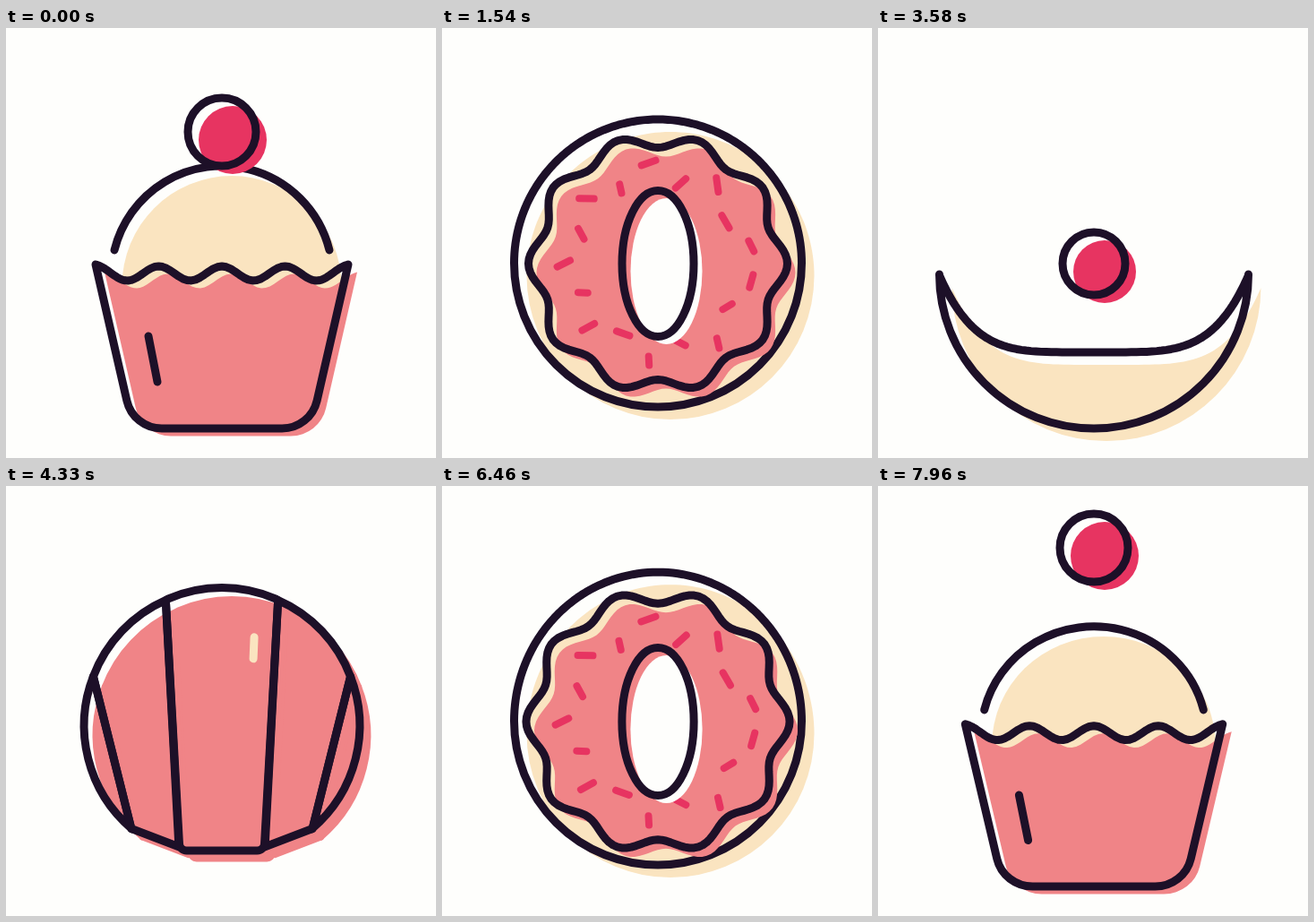
Animation of 480x480 px, one loop 8 s. Source, as an HTML page with a canvas:

```html
<!DOCTYPE html>
<html lang="en">
<head>
<meta charset="utf-8">
<title>Pastries</title>
<style>
html, body { margin: 0; height: 100%; overflow: hidden; background: #fefefc; }
canvas { display: block; width: 480px; height: 480px; }
</style>
</head>
<body>
<canvas id="stage"></canvas>
<script>
const LOOP = 8000, CYCLE = 2700, CX = 241;
const PAPER = '#fefefc', INK = '#1d1028', RED = '#e73461';
const PINK = [240, 132, 135], CREAM = [250, 228, 192];

const canvas = document.getElementById('stage');
const ctx = canvas.getContext('2d');
const ratio = window.devicePixelRatio || 1;
canvas.width = canvas.height = 480 * ratio;

const mix = (a, b, k) => a + (b - a) * k;
const mixAll = (a, b, k) => a.map((v, i) => mix(v, b[i], k));
const rgb = (a, b = a, k = 0) => `rgb(${mixAll(a, b, k).map(Math.round)})`;
const span = (p, from, to) => Math.min(1, Math.max(0, (p - from) / (to - from)));
const smooth = x => x * x * (3 - 2 * x);
const easeOut = (x, power) => 1 - (1 - x) ** power;
// Damped swing from 0 to 1 that overshoots once.
const spring = (t, decay, half) => t <= 0 ? 0 : 1 - Math.exp(-t / decay) * Math.cos(Math.PI * t / half);
const random = seed => {
  const x = Math.sin(seed * 127.1 + 3.7) * 43758.5453;
  return x - Math.floor(x);
};

function stroke(path, color = INK, width = 9) {
  ctx.strokeStyle = color;
  ctx.lineWidth = width;
  ctx.stroke(path);
}

// Bleed widens the fill a little so that neighbours leave no seam.
function fill(path, color, dx = 0, dy = 0, bleed = 0) {
  ctx.save();
  ctx.translate(dx, dy);
  ctx.fillStyle = color;
  ctx.fill(path);
  if (bleed) stroke(path, color, bleed);
  ctx.restore();
}

function ellipse(x, y, rx, ry = rx, from = 0, to = 2 * Math.PI) {
  const path = new Path2D();
  path.ellipse(x, y, Math.max(0, rx), Math.max(0, ry), 0, from, to);
  return path;
}

function line(x1, y1, x2, y2) {
  const path = new Path2D();
  path.moveTo(x1, y1);
  path.lineTo(x2, y2);
  return path;
}

// Closed polygon of [x, y, radius] corners.
function rounded(corners) {
  const path = new Path2D();
  const [x, y] = mixAll(corners[corners.length - 1], corners[0], 0.5);
  path.moveTo(x, y);
  corners.forEach(([cx, cy, r], i) => {
    const [nx, ny] = i + 1 < corners.length ? corners[i + 1] : [x, y];
    path.arcTo(cx, cy, nx, ny, Math.max(0, r));
  });
  path.closePath();
  return path;
}

// Upper edge from left to right; height takes u from -1 to 1.
function rim(half, height) {
  const path = new Path2D();
  for (let i = 0; i <= 90; i++) {
    const u = -Math.cos(Math.PI * i / 90);
    path.lineTo(CX + u * half, height(u));
  }
  return path;
}

function scaled(path, sx, sy, cx, cy) {
  const out = new Path2D();
  out.addPath(path, new DOMMatrix([sx, 0, 0, sy, cx * (1 - sx), cy * (1 - sy)]));
  return out;
}

// ---- Cupcake ----

// m = 0 is the paper cup, m = 1 the round bowl.
function cupPath(m) {
  const half = mix(141, 172.5, m), foot = mix(99, 172.5, m);
  const bottom = 447, radius = mix(40, 172, m);
  const path = rim(half, u => {
    const wave = 274 - 8 * Math.cos(4 * Math.PI * u) - 2 * u ** 20;
    return mix(wave, 276 + 86 * (1 - Math.abs(u) ** 4.6), m);
  });
  path.arcTo(CX + foot, bottom, CX - foot, bottom, radius);
  path.arcTo(CX - foot, bottom, CX - half, mix(264, 275, m), radius);
  path.closePath();
  return path;
}

function cupcake(m, color, sx) {
  const squash = path => scaled(path, sx, 1 - (sx - 1) / 2, CX, 447);
  const dome = Math.max(0, 1 - m / 0.6);
  const cup = squash(cupPath(m));
  const cy = mix(264, 277.6, dome);
  if (dome) fill(squash(ellipse(CX, cy, 122.5, 123 * dome)), rgb(CREAM), 11, 10.5);
  fill(cup, color, mix(10, 14, m), mix(8.5, 14, m));
  if (dome) stroke(squash(ellipse(CX, cy, 123.6, 123.6 * dome, Math.PI + 0.242, 2 * Math.PI - 0.242)));
  stroke(cup);
  if (m < 0.1) stroke(squash(line(159, 344, 169, 395)));
}

function cherryState(p) {
  if (p >= 2270) {
    const y = p < 2560
      ? mix(230, 69, easeOut(span(p, 2270, 2560), 4))
      : mix(69, 116, span(p, 2560, 2690) ** 2);
    return [y, 38 * span(p, 2270, 2340)];
  }
  const y = p < 460
    ? mix(116, 82, easeOut(span(p, 80, 400), 3))
    : mix(82, 263, span(p, 460, 880) ** 2);
  return [y, mix(38, 35, span(p, 680, 860))];
}

function cherry(p) {
  const [y, r] = cherryState(p);
  const ball = ellipse(CX, y, r);
  fill(ball, RED, 12, 9);
  stroke(ball);
}

// ---- Doughnut ----

function icingPath(size) {
  const path = new Path2D();
  for (let i = 0; i < 180; i++) {
    const a = i * Math.PI / 90;
    const r = size * (137 + 7.5 * Math.cos(10 * a));
    path.lineTo(CX + r * Math.cos(a), 263 + r * Math.sin(a));
  }
  path.closePath();
  return path;
}

function sprinkles(size, count = 17) {
  for (let i = 0; i < count; i++) {
    const around = (i + 0.5) * 2 * Math.PI / count;
    const r = (i % 2 ? 87 : 105) + 8 * random(i);
    const x = CX + r * Math.cos(around), y = 263 + r * Math.sin(around);
    const tilt = Math.PI * random(i + 40), half = 5 + 4 * random(i + 80);
    const dx = half * Math.cos(tilt), dy = half * Math.sin(tilt);
    stroke(scaled(line(x - dx, y - dy, x + dx, y + dy), size, size, CX, 263), RED, 8);
  }
}

function doughnut(p) {
  const grow = spring(p - 885, 60, 130);
  const settle = smooth(span(p, 885, 1040));
  const leave = smooth(span(p, 1555, 1615));
  const r = mix(mix(172.5, 160.5, settle), 154, leave);
  const cy = mix(mix(275, 262.5, settle), 267, leave);
  const top = mix(-87, r, grow);

  // The sagging edge of the bowl flips up into a half circle.
  const sharp = mix(4.6, 2, settle), bend = mix(1, 0.5, settle);
  const base = rim(r, u => cy - top * Math.max(0, 1 - Math.abs(u) ** sharp) ** bend);
  base.ellipse(CX, cy, r, r, 0, 0, Math.PI);
  base.closePath();
  fill(base, rgb(CREAM), 14, 14);
  stroke(base);

  const size = mix(mix(0.25, 1, grow), 1.12, leave);
  const icing = icingPath(size);
  const open = 1 - leave;
  const hole = ellipse(CX, 263, mix(35, 40, grow) * open, mix(35, 81.5, grow) * open);
  fill(icing, rgb(PINK), 9, 10);
  if (size > 0.6) sprinkles(size);
  fill(hole, PAPER, 9.5, 8.5);
  stroke(icing);
  if (open > 0.05) stroke(hole);
}

// ---- Croissant ----

const BALL = 154;
const onBall = (degrees, radius = 0, distance = BALL) => {
  const a = degrees * Math.PI / 180;
  return [CX + distance * Math.cos(a), 267 + distance * Math.sin(a), radius];
};
// Corner whose rounding is the arc of the ball between two angles.
const arcCorner = (a, b) => onBall((a + b) / 2, BALL, BALL / Math.cos((b - a) * Math.PI / 360));
const mirror = ([x, y, r]) => [2 * CX - x, y, r];
const mirrorPair = pair => pair.map(mirror);

// Each corner pairs its place on the sliced ball with its place on the roll.
const TIP = [
  [onBall(201), [108, 258, 0]],
  [arcCorner(201, 131), [26, 337, 13.5]],
  [onBall(131), [132, 328, 0]]
];
const SHOULDER = [
  [onBall(246), [178, 187, 0]],
  [arcCorner(246, 201), [104, 188, 60]],
  [onBall(201), [109, 254, 8]],
  [onBall(131), [133, 342, 14]],
  [[193, 404, 0], [188, 336, 0]]
];
const CROWN = [onBall(246, 4), [174, 173, 25]];
const FOOT = [[194, 408, 8], [189, 352, 15]];
const MIDDLE = [CROWN, [arcCorner(246, 294), [CX, 173, 0]], mirrorPair(CROWN), mirrorPair(FOOT), FOOT];

function croissant(p) {
  const k = spring(p - 1630, 55, 100);
  const leave = smooth(span(p, 2140, 2250));
  // The right tip hangs slightly lower than the left one.
  const droop = ([x, y, r]) => [x, y + 0.1 * k * Math.max(0, x - 377), r];
  const part = corners => {
    const now = corners.map(([ball, roll]) => droop(mixAll(ball, roll, k)));
    return scaled(rounded(now), 1 - 0.12 * leave, 1, CX, 352);
  };
  const parts = [TIP, TIP.map(mirrorPair), SHOULDER, SHOULDER.map(mirrorPair), MIDDLE].map(part);
  ctx.save();
  ctx.translate(0, 60 * leave);
  parts.forEach(path => fill(path, rgb(PINK), mix(11, 9, k), 11, 3));
  const [x, y] = mixAll([277, 168], [282, 212], k);
  stroke(line(x, y, x - 1, y + 24), rgb(CREAM));
  parts.forEach(path => stroke(path));
  ctx.restore();
}

function draw(time) {
  const p = time % LOOP % CYCLE;
  ctx.setTransform(ratio, 0, 0, ratio, 0, 0);
  ctx.fillStyle = PAPER;
  ctx.fillRect(0, 0, 480, 480);
  ctx.lineCap = ctx.lineJoin = 'round';

  if (p < 885) {
    const m = smooth(span(p, 560, 680));
    cupcake(m, rgb(PINK, CREAM, m), 1);
    cherry(p);
  } else if (p < 1615) {
    doughnut(p);
  } else if (p < 2250) {
    croissant(p);
  } else {
    const m = 1 - easeOut(span(p, 2250, 2380), 2);
    const wide = 0.057 * span(p, 2250, 2380) * (1 - span(p, 2380, 2700)) ** 1.3;
    cupcake(m, rgb(PINK), 1 + wide);
    if (p >= 2270) cherry(p);
  }
}

const start = performance.now();
function tick() {
  draw(performance.now() - start);
  requestAnimationFrame(tick);
}
tick();
</script>
</body>
</html>
```
